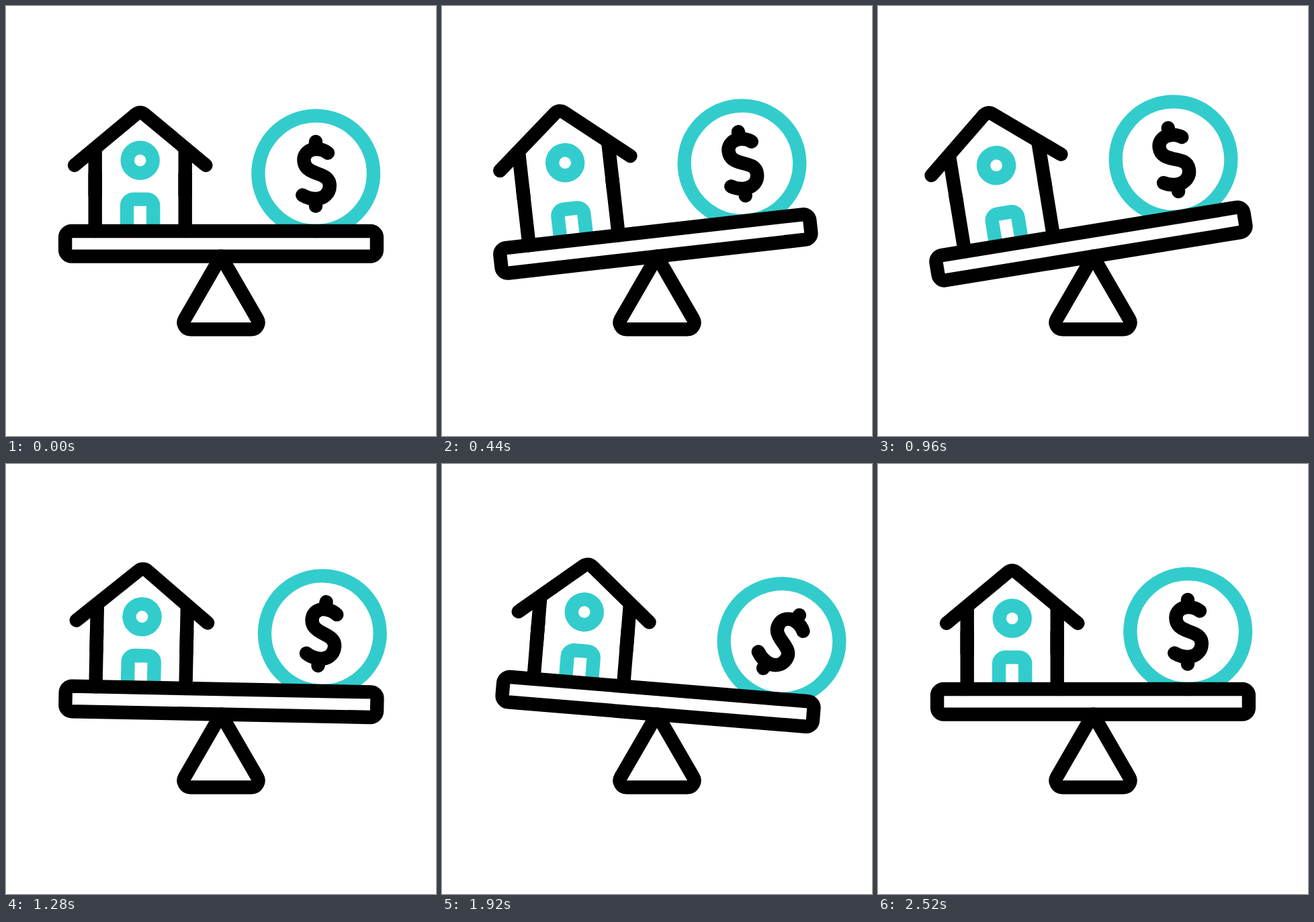
These frames come from a looping animation (640 by 640 pixels, 2.6 s). An HTML page:

```html
<!DOCTYPE html>
<html lang="en">
<head>
<meta charset="utf-8">
<title>House and coin on a seesaw</title>
<style>
  html, body { margin: 0; width: 100%; height: 100%; overflow: hidden; background: #fff; }
  svg { display: block; width: 100vw; height: 100vh; }
  .ink, .teal { fill: none; stroke-width: 20.4; stroke-linejoin: round; }
  .ink { stroke: #000; stroke-linecap: round; }
  .teal { stroke: #3cc; }
</style>
</head>
<body>
<svg viewBox="0 0 640 640">
  <g id="seesaw">
    <g id="coin">
      <circle class="teal" cx="461.2" cy="249.2" r="85.8"/>
      <path class="ink" d="M461 202V212M461 288V297.7M479 218.7C474 214.7 468 213 461.5 213C451 213 443.4 220 443.4 229C443.4 241 452 245 461 248.5C472 252.5 481.8 255.5 481.8 267.5C481.8 279 473 287 461 287C453.5 287 446.5 284.7 441.3 281.5"/>
    </g>
    <path class="teal" d="M180.1 335V297.1A9.5 9.5 0 0 1 189.6 287.6H209.7A9.5 9.5 0 0 1 219.2 297.1V335"/>
    <circle id="pane" class="teal" cx="199.7" cy="229.7" r="19"/>
    <path class="ink" d="M132.7 335V250M266.7 335V250"/>
    <g id="roof" class="ink">
      <path d="M132.7 213V282M266.7 213V282"/>
      <path d="M102 237L193.3 161.1A10 10 0 0 1 206.1 161.1L297.4 237"/>
    </g>
    <rect class="ink" x="88.1" y="335" width="463.8" height="37.6" rx="9.5"/>
  </g>
  <path class="ink" d="M265.9 466.2L320 372.6L374.1 466.2A10 10 0 0 1 365.4 481.2H274.6A10 10 0 0 1 265.9 466.2Z"/>
</svg>
<script>
  const LOOP = 2600, STEP = 40;

  // Each track is a list of [time in ms, value].
  const TILT = [[80, 0], [743, -11], [1618, 5.98], [2500, 0]];
  const LIFT = [[80, 0], [760, 1], [1272, 0]];
  const ROLL = [[1085, 0], [1702, 1], [2500, 0]];
  const ROOF_LIFT = 31, PANE_LIFT = 19.5, ROLL_PX = 40, ROLL_DEG = 34;

  const [seesaw, coin, pane, roof] =
    ['seesaw', 'coin', 'pane', 'roof'].map(id => document.getElementById(id));

  // cubic-bezier(.5, 0, .5, 1)
  function ease(x) {
    let lo = 0, hi = 1;
    for (let i = 0; i < 24; i++) {
      const s = (lo + hi) / 2;
      if (1.5 * s * (1 - s) + s * s * s < x) lo = s; else hi = s;
    }
    return lo * lo * (3 - 2 * lo);
  }

  function at(track, t) {
    if (t <= track[0][0]) return track[0][1];
    for (let i = 1; i < track.length; i++) {
      const [t0, v0] = track[i - 1], [t1, v1] = track[i];
      if (t < t1) return v0 + (v1 - v0) * ease((t - t0) / (t1 - t0));
    }
    return track[track.length - 1][1];
  }

  const set = (el, transform) => el.setAttribute('transform', transform);

  function draw(t) {
    const lift = at(LIFT, t), roll = at(ROLL, t);
    set(seesaw, `rotate(${at(TILT, t)} 320 372.7)`);
    set(roof, `translate(0 ${-ROOF_LIFT * lift})`);
    set(pane, `translate(0 ${-PANE_LIFT * lift})`);
    set(coin, `translate(${ROLL_PX * roll} 0) rotate(${ROLL_DEG * roll} 461.2 249.2)`);
  }

  const start = performance.now();
  function tick() {
    const t = (performance.now() - start) % LOOP;
    draw(Math.floor(t / STEP) * STEP);
    requestAnimationFrame(tick);
  }
  tick();
</script>
</body>
</html>
```
